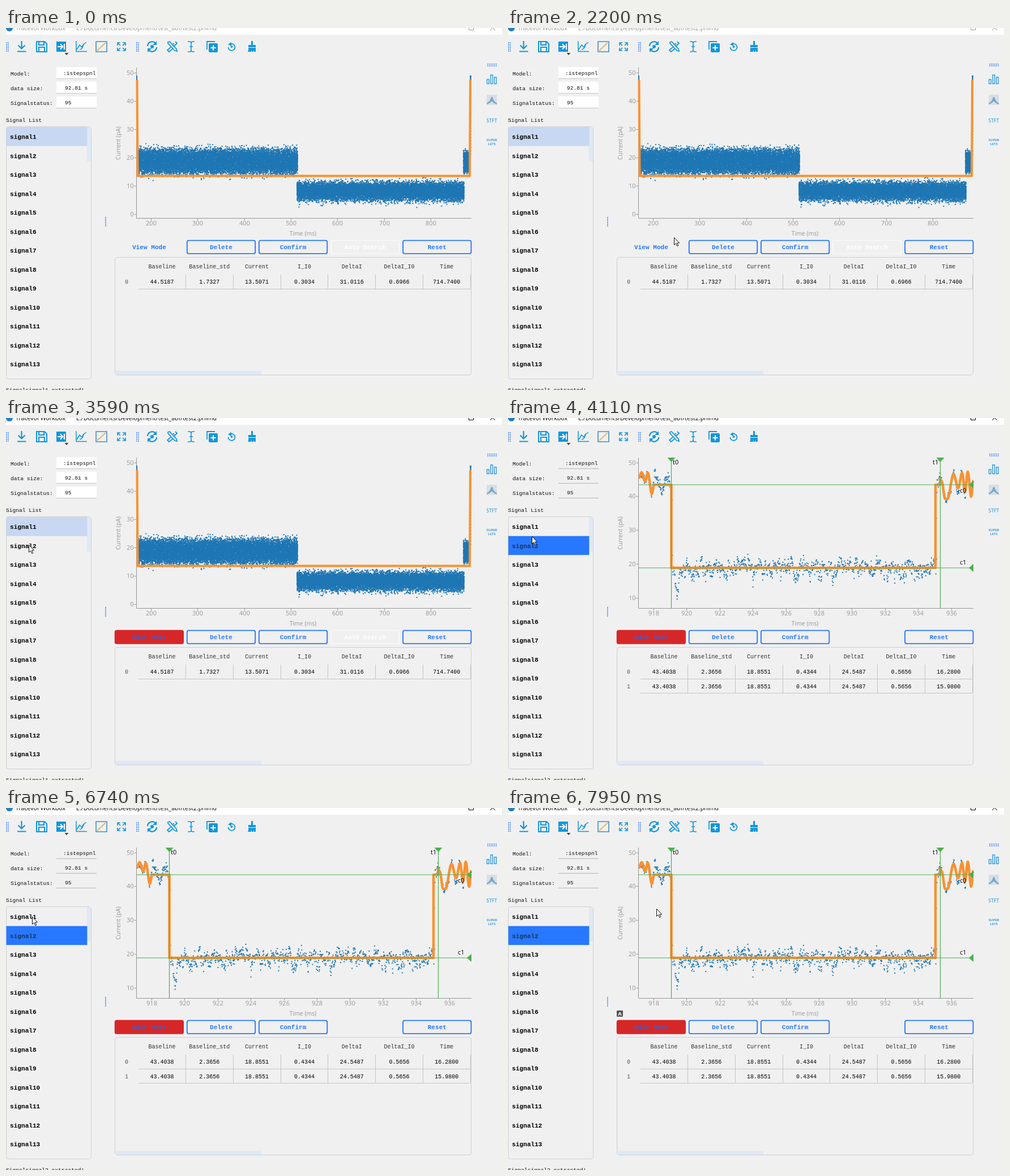
Write an HTML page with a canvas that moves like this. It is 876 px wide and 640 px high and loops after 8000 ms.

```html
<!DOCTYPE html>
<html lang="en">
<head>
<meta charset="utf-8">
<title>Signal viewer</title>
<style>
html, body { margin: 0; width: 876px; height: 640px; overflow: hidden; background: #f0f0f0; }
canvas { display: block; }
</style>
</head>
<body>
<canvas id="stage" width="876" height="640"></canvas>
<script>
const W = 876, H = 640, LOOP = 8000;
const MONO = '"Liberation Mono", monospace', SANS = '"Open Sans", sans-serif';
const BLUE = '#2878ff', ICON = '#1296db', DOT = '#1f77b4', ORANGE = '#fa9130', GREEN = '#4caf50';
const screen = document.getElementById('stage').getContext('2d');
let g = screen;

// Pointer stops: [time, x, y]
const stops = [
  [1270, 476, 610], [1420, 448, 560], [1540, 410, 440], [1660, 358, 318],
  [1810, 319, 288], [1930, 339, 263], [2080, 322, 310], [2200, 293, 370],
  [2320, 266, 386], [2440, 249, 389], [2930, 249, 390], [3080, 249, 395],
  [3200, 188, 352], [3320, 112, 288], [3440, 54, 242], [3590, 40, 224],
  [3710, 39, 224], [4110, 42, 209], [4230, 46, 194], [4380, 46, 192],
  [7410, 45, 205], [7530, 43, 215], [7800, 44, 219], [7950, 262, 178]
];

const views = [
  {
    xTicks: [200, 300, 400, 500, 600, 700, 800], x: v => 256 + (v - 200) * 0.8233,
    yTicks: [0, 10, 20, 30, 40, 50], y: v => 329 - v * 5,
    t0: 231, t1: 820, c0: 107, c1: 261.5, t0Label: 234, t1Label: 807, c0Label: 121, c1Label: 256,
    rows: ['44.5187 1.7327 13.5071 0.3034 31.0116 0.6966 714.7400']
  },
  {
    xTicks: [918, 920, 922, 924, 926, 928, 930, 932, 934, 936], x: v => 257 + (v - 918) * 29.2,
    yTicks: [10, 20, 30, 40, 50], y: v => 378 - v * 5.99,
    t0: 288.5, t1: 763.5, c0: 118, c1: 265, t0Label: 291, t1Label: 750, c0Label: 132, c1Label: 259,
    rows: ['43.4038 2.3656 18.8551 0.4344 24.5487 0.5656 16.2800',
           '43.4038 2.3656 18.8551 0.4344 24.5487 0.5656 15.9800']
  }
];

let seed = 7;
const rand = () => (seed = (seed * 16807) % 2147483647) / 2147483647;
const gauss = () => Math.sqrt(-2 * Math.log(rand())) * Math.cos(2 * Math.PI * rand());

function text(s, x, y, color = '#111', size = 9.6, family = MONO, align = 'left', weight = '') {
  g.font = `${weight} ${size}px ${family}`;
  g.fillStyle = color;
  g.textAlign = align;
  g.fillText(s, x, y);
}
function rect(x, y, w, h, color) {
  g.fillStyle = color;
  g.fillRect(x, y, w, h);
}
function round(x, y, w, h, r, fill, stroke, width = 1) {
  g.beginPath();
  g.roundRect(x, y, w, h, r);
  if (fill) { g.fillStyle = fill; g.fill(); }
  if (stroke) { g.strokeStyle = stroke; g.lineWidth = width; g.stroke(); }
}
function line(path, color = ICON, width = 2) {
  g.strokeStyle = color;
  g.lineWidth = width;
  g.stroke(new Path2D(path));
}
function fill(path, color = ICON) {
  g.fillStyle = color;
  g.fill(new Path2D(path));
}
function layer(draw) {
  const c = document.createElement('canvas');
  c.width = W; c.height = H;
  g = c.getContext('2d');
  draw();
  g = screen;
  return c;
}
const dot = (x, y) => rect(x - 1, y - 1, 2, 2, DOT);

function grip(x, y, cols, rows) {
  for (let i = 0; i < cols; i++)
    for (let j = 0; j < rows; j++) rect(x + i * 3, y + j * 3, 1.6, 1.6, BLUE);
}

function toolbar() {
  grip(0, 25, 2, 6);
  grip(230, 25, 2, 6);
  line('M27.5 23V36M21.5 30.5l6 6 6-6M20 41.5h15.5', ICON, 2.2);
  line('M54 24h14l4 4v14H54zM58 24v6h9v-6M58 42v-8h10v8');
  fill('M89 24h17v18H89z');
  line('M91 33h9M96 28.500l4.500 4.500-4.500 4.500M103 28v10', '#fff', 2);
  fill('M103.500 44h7l-3.500 4z', '#444');
  line('M124 23v18.500h19M125 38l5-8 4 4 3-6M130 38q4 0 6-6 2-6 6-6', ICON, 1.5);
  line('M159 24h19v18h-19z', '#3b91c0', 1.6);
  line('M161 40l15-14', '#f0b45a', 2);
  line('M197 31v-5h5M206 26h5v5M211 35v5h-5M202 40h-5v-5M198 27l4 4M210 27l-4 4M210 39l-4-4M198 39l4-4', ICON, 1.7);
  line('M250 32a8 8 0 0 1 14-5M266 34a8 8 0 0 1-14 5', ICON, 2.3);
  fill('M266 23v7h-7zM250 43v-7h7zM261 33a3 3 0 1 0-6 0a3 3 0 1 0 6 0');
  line('M286 25l3-1 12 13 1 4-4-1-12-13zM299 24l3 3-5 5M291 34l-6 5 3 3 6-5M295 27l2 2', ICON, 1.8);
  line('M321 24h3q3 0 3 3v12q0 3-3 3h-3M333 24h-3q-3 0-3 3v12q0 3 3 3h3M324 33h6', ICON, 1.6);
  line('M355 38V24h14', ICON, 1.8);
  round(358, 27, 16, 16, 2, ICON);
  line('M366 30.500v9M361.500 35h9', '#fff', 2);
  line('M395 29a6 6 0 1 1-2.500 5', ICON, 1.8);
  fill('M392 29l6-4v7zM400.500 33a2 2 0 1 0-4 0a2 2 0 1 0 4 0');
  fill('M433 23h3v7h5v4h-13v-4h5zM428 35h13v7h-3v-4l-1 4h-3v-4l-1 4h-6q2-3 1-7z');

  grip(850, 63, 6, 2);
  line('M849.500 91h3.500v7.500h-3.500zM856 83h3.500v15.500H856zM862.500 87h3.500v11.500h-3.500z', '#2f9bdc', 1.4);
  rect(849, 118, 18, 18, '#d9dee2');
  fill('M849 133q6-3 8-11h2q2 8 8 11v2q-6-2-9-6-3 4-9 6z', '#72a9cb');
  text('STFT', 858, 167, '#4ba3d8', 8.5, SANS, 'center', '600');
  text('SUPER', 858, 200, '#3b9bd8', 6, SANS, 'center', '700');
  text('LETS', 858, 207, '#3b9bd8', 6, SANS, 'center', '700');
}

function axes(v) {
  const gray = '#969696';
  line('M230.500 70V336.500H822', gray, 1);
  for (const n of v.xTicks) {
    const x = Math.round(v.x(n)) + 0.5;
    line(`M${x} 336v4`, gray, 1);
    text(n, x, 348.5, gray, 11, SANS, 'center');
  }
  for (const n of v.yTicks) {
    const y = Math.round(v.y(n)) + 0.5;
    line(`M226.500 ${y}h4`, gray, 1);
    text(n, 225.5, y + 3.5, gray, 11, SANS, 'right');
  }
  text('Time (ms)', 524.5, 367, gray, 10.4, SANS, 'center');
  g.save();
  g.translate(202, 203.5);
  g.rotate(-Math.PI / 2);
  text('Current (pA)', 0, 0, gray, 10.4, SANS, 'center');
  g.restore();
}

function band(x0, x1, mid, spread, sd, count, upScale) {
  for (let i = 0; i < count; i++) {
    const d = (rand() * 2 - 1) * spread + gauss() * sd;
    dot(x0 + rand() * (x1 - x0), mid + (d < 0 ? d * upScale : d));
  }
}

function longSignal() {
  axes(views[0]);
  band(232, 515, 235.5, 18, 5, 13000, 0.95);
  band(514, 809, 288, 12, 5.2, 13000, 0.88);
  band(808, 818, 237, 16, 4, 600, 0.95);
  for (let i = 0; i < 45; i++) {
    dot(231, 85 + i * i / 14);
    dot(820.5, 85 + i * i / 14);
  }
  g.lineJoin = 'round';
  line('M231.500 92L232.500 261.500H819L820 92', ORANGE, 4);
}

// Turning points of the two open-pore stretches
const before = [[231, 106], [236, 96], [242, 112], [247, 97], [254, 134], [258, 118]];
const after = [[763, 107], [766, 112], [772, 143], [776, 143], [787, 99], [795, 124], [802, 97], [807, 130], [812, 95], [818, 139], [822, 110]];

function wave(x) {
  const pts = x < 500 ? before : after;
  const i = Math.max(1, pts.findIndex(p => p[0] >= x));
  const [x0, y0] = pts[i - 1], [x1, y1] = pts[i];
  return y0 + (y1 - y0) * (1 - Math.cos(Math.PI * (x - x0) / (x1 - x0))) / 2;
}
function wavePath(x0, x1) {
  let d = '';
  for (let x = x0; x <= x1; x++) d += `L${x} ${wave(x)}`;
  return d;
}

function shortSignal() {
  axes(views[1]);
  let drift = 0;
  for (let x = 231; x < 822; x += 0.48) {
    drift = drift * 0.68 + gauss() * 5.8;
    let y;
    if (x < 258 || x > 763) y = wave(x) + drift * 0.65;
    else if (x < 289) y = 118 + 14 * Math.sin((x - 265) * 0.3) + drift;
    else if (x < 291) y = 100 + rand() * 165;
    else if (x > 758) y = 108 + drift;
    else if (x > 756) y = 120 + rand() * 140;
    else y = 265 + drift * (drift > 0 ? 1.35 : 1) + 46 * Math.exp(-(((x - 299) / 3.4) ** 2));
    dot(x, Math.max(86, Math.min(321, y)));
  }
  g.save();
  g.beginPath();
  g.rect(230, 70, 592, 267);
  g.clip();
  g.lineJoin = 'round';
  line('M231 106' + wavePath(231, 258) + 'H288.500V265H755V118H763' + wavePath(763, 822), ORANGE, 4.5);
  g.restore();
}

function markers(v) {
  g.save();
  g.beginPath();
  g.rect(230, 70, 592, 267);
  g.clip();
  line(`M${v.t0} 70V337M${v.t1} 70V337M230 ${v.c0}H822M230 ${v.c1}H822`, GREEN, 1.2);
  for (const x of [v.t0, v.t1]) fill(`M${x - 7} 70h14l-7 8z`, GREEN);
  for (const y of [v.c0, v.c1]) fill(`M822 ${y - 7}v14l-8-7z`, GREEN);
  g.restore();
  text('t0', v.t0Label, 82, '#000', 11, SANS);
  text('t1', v.t1Label, 82, '#000', 11, SANS);
  text('c0', 798, v.c0Label, '#000', 11, SANS);
  text('c1', 798, v.c1Label, '#000', 11, SANS);
}

function titleBar(active) {
  const color = active ? '#000' : '#999';
  rect(0, 0, W, 12, '#fff');
  g.fillStyle = '#1f7fc0';
  g.beginPath();
  g.arc(6, 0, 6, 0, 7);
  g.fill();
  text('Tracevol Workbox', 17, 4, color, 10.7, SANS);
  text('E:/Documents/Development/test_abf/test2.phlmd', 124, 4, color, 10.7, SANS);
  line('M817.500 0V3.500H825.500V0M855 4l4.500-4.500 4.500 4.500', color, 1);
}

function form(second) {
  const fields = [['Model:', ':istepspnl', 101], ['data size:', '92.81 s', 104], ['Signalstatus:', '95', 104]];
  fields.forEach(([label, value, x], i) => {
    const y = 69 + i * 26;
    if (!second) rect(89, y, 71, 21, '#fff');
    rect(89, y + 20, 71, 1, second ? '#b4b4b4' : '#c4c4c4');
    text(label, 8, y + 15);
    text(value, x, y + 14);
  });
}

function list(selected, focused) {
  text('Signal List', 0, 166);
  round(0.5, 174.5, 150, 446, 4, null, '#d0d0d0');
  rect(143, 175, 7, 61, '#dfe8f5');
  rect(0.6, 175.2 + selected * 33.5, 142.8, 33.5, focused ? BLUE : '#c8d8f2');
  for (let i = 0; i < 13; i++)
    text('signal' + (i + 1), 7, 196 + i * 33.5, focused && i === selected ? '#1b3358' : '#000', 11.1, MONO, 'left', 'bold');
}

function button(label, i, color = BLUE, border = BLUE, bg) {
  const x = 191.7 + i * 127.1;
  round(x + 1, 375.6, 120.4, 23.3, 3, bg, border, 1.9);
  text(label, x + 61.2, 391, color, 11.1, MONO, 'center', 'bold');
}

function table(rows) {
  round(192.5, 405.5, 629, 208, 4, null, '#cfcfcf');
  rect(193, 606, 258, 7, '#dfe8f5');
  const center = c => 275.5 + c * 83.8;
  ['Baseline', 'Baseline_std', 'Current', 'I_I0', 'DeltaI', 'DeltaI_I0', 'Time']
    .forEach((s, c) => text(s, center(c), 424.5, '#333', 10, MONO, 'center'));
  rows.forEach((row, r) => {
    const y = 452 + r * 25.5;
    text(r, 213, y, '#555', 10, MONO, 'center');
    row.split(' ').forEach((s, c) => {
      text(s, center(c), y, '#000', 10, MONO, 'center');
      rect(Math.round(317 + c * 83.8), 436 + r * 25, 1, 25, '#c4c4c4');
    });
    rect(234, 461 + r * 25, 586, 1, '#c4c4c4');
  });
}

function tooltip(alpha) {
  g.save();
  g.globalAlpha = alpha;
  g.shadowColor = 'rgba(0,0,0,.5)';
  g.shadowBlur = 3;
  g.shadowOffsetX = g.shadowOffsetY = 2;
  rect(48, 206, 55, 24, '#fff');
  g.shadowColor = 'transparent';
  text('signal1', 55.5, 221);
  g.restore();
}

function pointer(x, y) {
  const shape = `M${x + 0.5} ${y + 0.5}v13l3-2.800 2.300 5 2-1-2.200-4.700h4z`;
  fill(shape, '#fff');
  line(shape, '#111', 1);
}

const plots = [layer(longSignal), layer(shortSignal)];
const tools = layer(toolbar);

function draw(t) {
  const second = (t >= 3710 && t < 6890) || t >= 7650;
  const view = views[+second];
  const edit = t >= 2810, clicked = t >= 3710;
  const stop = stops.findLast(s => s[0] <= t);

  rect(0, 0, W, H, '#f0f0f0');
  titleBar(t >= 2690);
  g.drawImage(tools, 0, 0);
  form(second);
  list(+second, clicked);
  for (let y = 334; y < 350; y += 3) rect(175, y, 1.7, 1.7, BLUE);

  g.drawImage(plots[+second], 0, 0);
  if (clicked) markers(view);

  if (edit) button('Edit Mode', 0, '#2f62d8', '#d62728', '#d62728');
  else button('View Mode', 0, BLUE, null);
  button('Delete', 1);
  button('Confirm', 2);
  if (!second) button('Auto Search', 3, '#fff', '#f8f8f8');
  button('Reset', 4);
  table(view.rows);
  text(`Signalsignal${second ? 2 : 1} extracted!`, 0, 642.5);

  if (t >= 5120 && t < 6740) tooltip(t < 5240 ? 0.5 : 1);
  if (stop) {
    const [, x, y] = stop;
    if (x > 192 && y < 370) {
      round(192, 358, 11, 11, 1, '#555');
      text('A', 197.5, 367, '#fff', 9.5, SANS, 'center', 'bold');
    }
    pointer(x, y);
  }
}

function frame() {
  draw(performance.now() % LOOP);
  requestAnimationFrame(frame);
}
frame();
</script>
</body>
</html>
```
